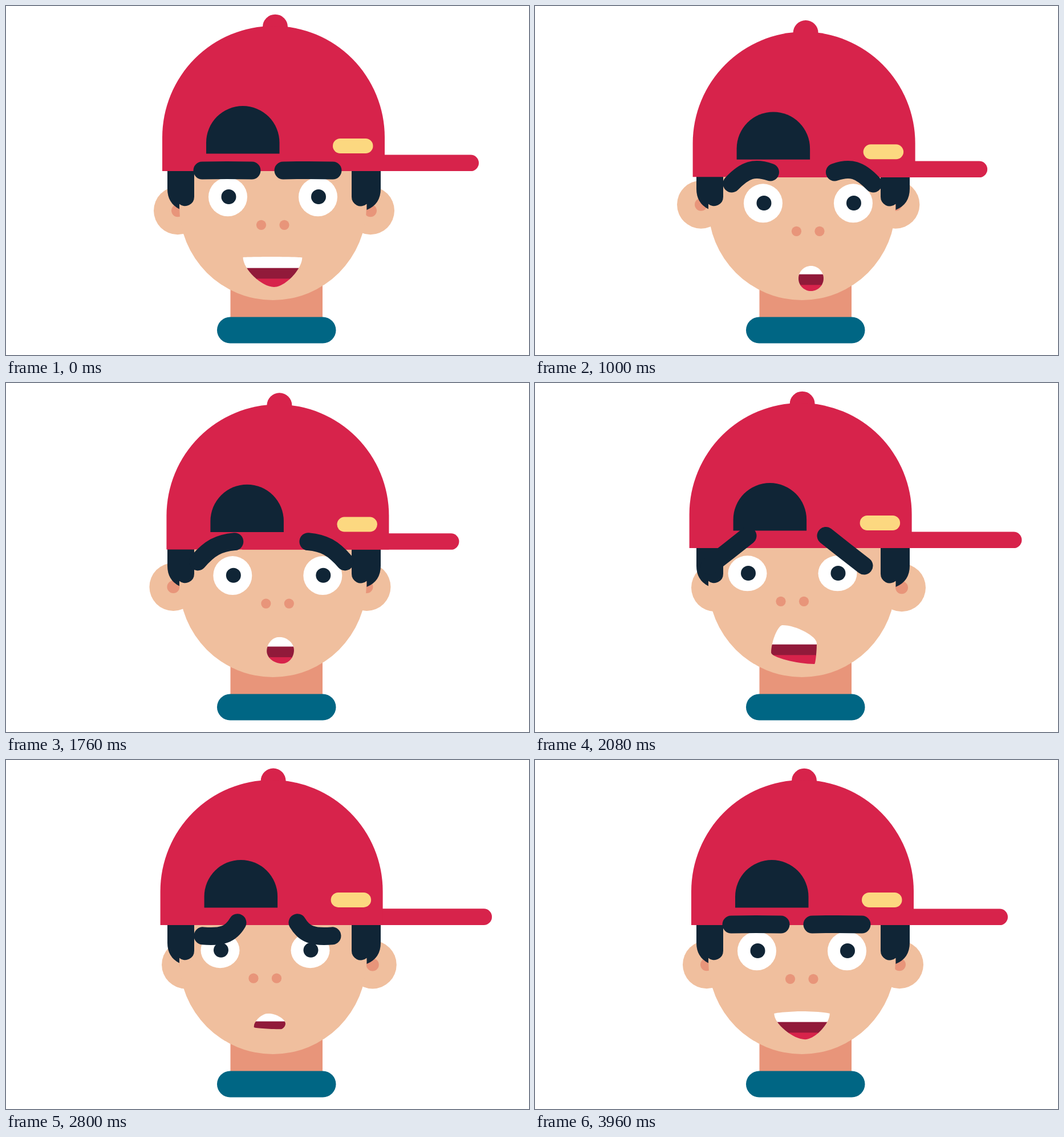
Animation, 917 px wide and 611 px high, one loop 4 s. Source, as an HTML page:

```html
<!DOCTYPE html>
<html lang="en">
<head>
<meta charset="utf-8">
<title>Talking boy with a cap</title>
<style>
  html, body { margin: 0; width: 100%; height: 100%; overflow: hidden; background: #fff; }
  svg { display: block; width: 100%; height: 100%; }
  .skin { fill: #f0bf9e; }
  .blush { fill: #e8957a; }
  .dark { fill: #102536; }
  .red { fill: #d7234b; }
  .white { fill: #fff; }
  .brow { fill: none; stroke: #102536; stroke-width: 31; stroke-linecap: round; stroke-linejoin: round; }
</style>
</head>
<body>
<svg viewBox="0 0 917 611">
  <defs><clipPath id="mouthClip"><path id="mouthShape"/></clipPath></defs>

  <g id="earL"><circle class="skin" cx="301" cy="358.3" r="42"/><circle class="blush" cx="301" cy="358.3" r="11"/></g>
  <g id="earR"><circle class="skin" cx="639" cy="358.3" r="42"/><circle class="blush" cx="639" cy="358.3" r="11"/></g>
  <rect class="blush" x="393.5" y="440" width="161.5" height="120"/>
  <rect x="370" y="544.5" width="208.5" height="46" rx="23" fill="#006684"/>
  <path class="skin" d="M304 270V351A164 164 0 0 0 632 351V270Z"/>

  <path class="dark" d="M283 270V320Q283 345 304 355.5V346.5A16 16 0 0 0 330 334V270Z"/>
  <path class="dark" d="M657 270V320Q657 347 632.5 357V346.5A16 16 0 0 1 606 334V270Z"/>

  <path id="brim" class="red"/>
  <g id="cap">
    <circle class="red" cx="472" cy="36.7" r="22"/>
    <path class="red" d="M274 289V230A195 195 0 0 1 664 230V289Z"/>
    <path class="dark" d="M351 258.5V239.3A64.25 64.25 0 0 1 479.5 239.3V258.5Z"/>
    <rect x="573" y="232" width="70.5" height="26" rx="13" fill="#fcd880"/>
  </g>

  <g id="face">
    <ellipse class="eye white" cx="389" cy="334.3" rx="34" ry="34"/>
    <ellipse class="eye white" cx="547" cy="334.3" rx="34" ry="34"/>
    <circle class="dark" cx="390.5" cy="334" r="13"/>
    <circle class="dark" cx="548" cy="334" r="13"/>
    <circle class="blush" cx="447.5" cy="383.3" r="8.6"/>
    <circle class="blush" cx="488" cy="383.3" r="8.6"/>
    <g clip-path="url(#mouthClip)">
      <rect class="white" x="380" y="400" width="190" height="60"/>
      <rect x="380" y="458.7" width="190" height="20" fill="#911a3a"/>
      <rect class="red" x="380" y="477.3" width="190" height="50"/>
    </g>
    <path id="browL" class="brow"/>
    <path id="browR" class="brow"/>
  </g>
</svg>
<script>
const LOOP = 4000, STEP = 40;
const $ = id => document.getElementById(id);
const eyes = document.querySelectorAll('.eye');

const ramp = (t, from, to) => Math.min(1, Math.max(0, (t - from) / (to - from)));
const ease = (t, from, to) => { const u = ramp(t, from, to); return u * u * (3 - 2 * u); };
const bump = (t, start, length) => Math.sin(Math.PI * ramp(t, start, start + length)) ** 2;
const mix = (a, b, u) => a.map((v, i) => v + (b[i] - v) * u);

// Head motion: a look to the right, then to the left, with a nod during each turn.
const lookRight = t => ease(t, 780, 1140) - ease(t, 1640, 2010);
const lookLeft = t => ease(t, 1640, 2010) - ease(t, 2700, 3360);
const faceX = t => 16.5 * (ease(t, 780, 1140) - 2 * ease(t, 1640, 2010) + ramp(t, 2500, 3520) ** 1.4);
const nod = t => 11 * (bump(t, 820, 360) + bump(t, 1700, 360)) - bump(t, 2700, 860);
const squint = t => ease(t, 1960, 2080) - ease(t, 2800, 3300);

// A pose eases into the next one; steps are [from, to, pose].
const play = (start, steps) => t =>
  steps.reduce((pose, [from, to, next]) => mix(pose, next, ease(t, from, to)), start);

// Mouth poses: left, top, right and bottom points, then roundness.
const grin = [407, 430.5, 466.6, 436.5, 525, 432, 461, 498, 0.4];
const round = [451, 466, 473, 444, 495, 466, 473, 488, 0.55];
const shout = [430.5, 473, 450.5, 425, 510.5, 457, 506.5, 493, 0.4];
const worry = [448, 469, 473.5, 445, 503.5, 463, 495.5, 472.5, 0.45];
const doubt = [440, 467, 472, 446, 503, 464, 495, 474.5, 0.38];
const mouth = play(grin, [
  [500, 960, round], [1680, 2080, shout], [2280, 2800, worry], [2800, 3280, doubt], [3680, 4160, grin]
]);

// Brow poses: mirror axis, then outer end, knee and inner end as offset and height.
const flat = [458.5, 114.5, 288, 71, 287, 27.5, 288];
const raised = [458, 124, 300, 93, 267, 56.5, 280];
const arched = [457, 129, 310, 101.5, 278, 64.5, 275];
const steep = [458, 135.5, 321, 102, 295, 68.5, 268.5];
const sad = [472, 113.5, 309, 68.5, 313, 52.5, 286];
const puzzled = [472.7, 111.5, 305, 53.5, 306, 50.5, 291];
const brows = play(flat, [
  [700, 1000, raised], [1000, 1400, arched], [1740, 2060, steep],
  [2280, 2800, sad], [2800, 3240, puzzled], [3680, 3920, flat]
]);

// Quarter curve that leaves a side point vertically and meets the top or bottom horizontally.
function mouthPath([lx, ly, tx, ty, rx, ry, bx, by, k]) {
  const toApex = (x, y, ax, ay) => `C${x} ${y + k * (ay - y)} ${ax + k * (x - ax)} ${ay} ${ax} ${ay}`;
  const toSide = (ax, ay, x, y) => `C${ax + k * (x - ax)} ${ay} ${x} ${y + k * (ay - y)} ${x} ${y}`;
  return `M${lx} ${ly}` + toApex(lx, ly, tx, ty) + toSide(tx, ty, rx, ry)
    + toApex(rx, ry, bx, by) + toSide(bx, by, lx, ly) + 'Z';
}

function browPath([axis, ...offsets], side) {
  const [ox, oy, kx, ky, ix, iy] = offsets.map((v, i) => i % 2 ? v : axis + side * v);
  const knee = [kx, ky], outer = [ox, oy], inner = [ix, iy];
  return `M${outer}C${mix(outer, knee, 0.75)} ${mix(inner, knee, 0.75)} ${inner}`;
}

const move = (id, x, y) => $(id).setAttribute('transform', `translate(${x} ${y})`);

function draw(t) {
  const right = lookRight(t), left = lookLeft(t), dip = nod(t), sq = squint(t);

  move('earL', 15 * (left - right), -nod(t - 20));
  move('earR', 4 * left - 10 * right, -nod(t - 20));
  move('cap', 7.8 * lookRight(t - 80) - 3.4 * lookLeft(t - 80), dip * 0.94);
  move('face', faceX(t), dip - sq);

  const tip = 814.7 - 54 * right + 24.5 * left;
  $('brim').setAttribute('d', `M414 ${260.5 + dip}H${tip}a14.3 14.3 0 0 1 0 28.6H414Z`);
  eyes.forEach(eye => eye.setAttribute('ry', 34 - 3 * sq));

  // The last mouth move runs past the end of the loop.
  $('mouthShape').setAttribute('d', mouthPath(mouth(t < 160 ? t + LOOP : t)));
  const brow = brows(t);
  $('browL').setAttribute('d', browPath(brow, -1));
  $('browR').setAttribute('d', browPath(brow, 1));
}

function frame() {
  draw(Math.floor(performance.now() % LOOP / STEP) * STEP);
  requestAnimationFrame(frame);
}
frame();
</script>
</body>
</html>
```
